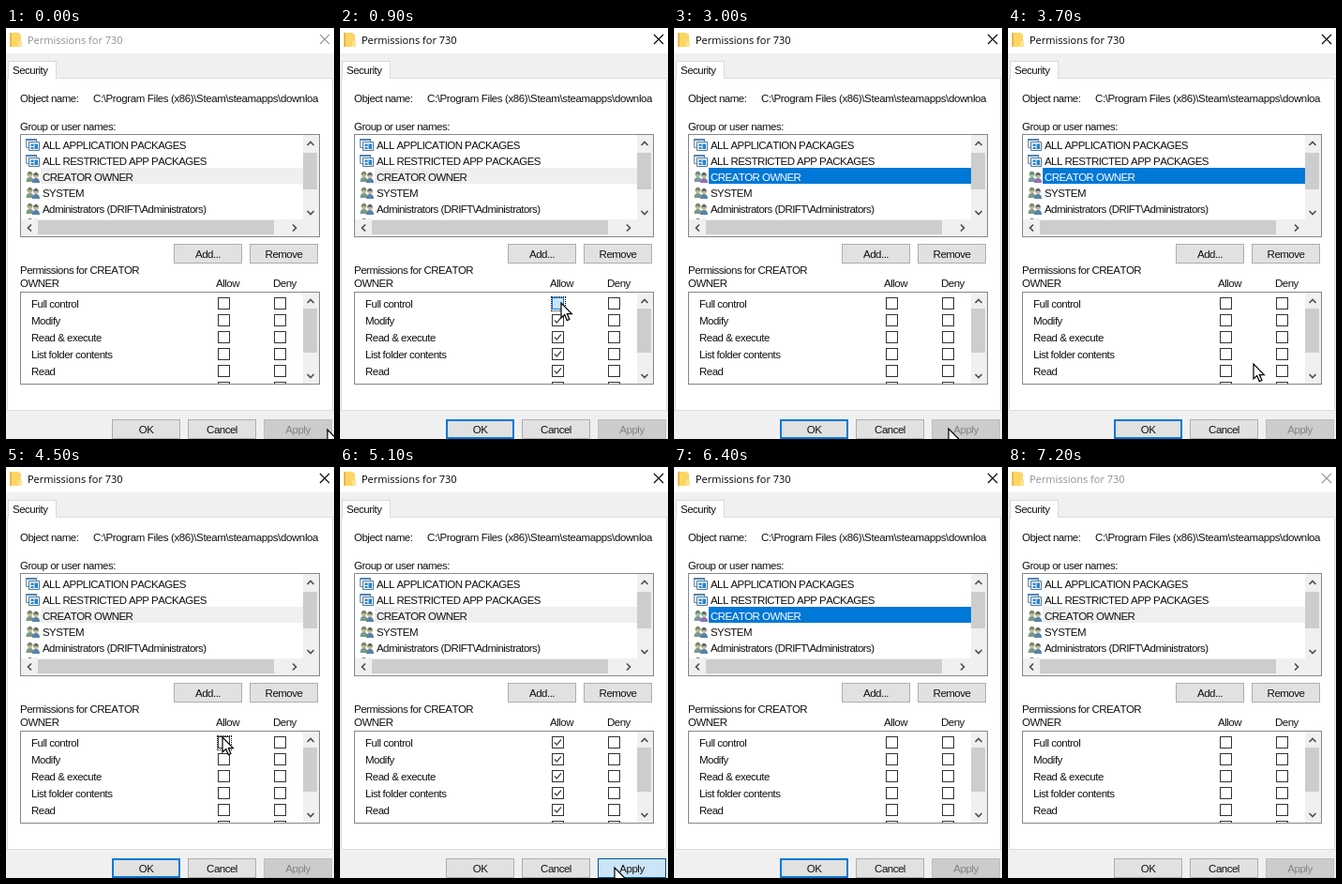
These frames come from a looping animation (350 px wide and 438 px high, 7.5 s). An HTML page:

```html
<!DOCTYPE html>
<html lang="en">
<head>
<meta charset="utf-8">
<title>Permissions dialog</title>
<style>
html, body { margin: 0; width: 100%; height: 100%; overflow: hidden; }
#stage { position: relative; width: 350px; height: 438px; overflow: hidden; background: #f0f0f0;
  font: 11.5px/14px "Liberation Sans", Arial, sans-serif; font-kerning: none;
  letter-spacing: -.5px; color: #111; }
#stage div, #stage svg { position: absolute; box-sizing: border-box; white-space: pre; }
svg { overflow: visible; fill: none; }
.bar { background: #fff; }
.title { font: 11px/14px "Open Sans", sans-serif; letter-spacing: 0; color: #000; }
.close { stroke: #000; stroke-width: 1.1; }
.inactive .title { color: #8f8f8f; }
.inactive .close { stroke: #999; }
.page { background: #fff; border: 1px solid #dcdcdc; }
.tab { background: #fff; border: 1px solid #d9d9d9; border-bottom: 0; }
.list { background: #fff; border: 1px solid #828790; overflow: hidden; }
.list .name { letter-spacing: -.55px; }
.path { letter-spacing: -.38px; overflow: hidden; }
.row { background: #efefef; }
.picked .row { background: #0078d7; }
.picked .owner { color: #fff; }
.picked .ownerIcon { filter: hue-rotate(60deg); }
.track { background: #f0f0f0; }
.thumb { background: #cdcdcd; }
.arrow { stroke: #505050; stroke-width: 1.7; }
.btn { background: #e1e1e1; border: 1px solid #adadad; text-align: center; line-height: 20px; }
.btn.def { border: 2px solid #0078d7; line-height: 18px; }
.btn.hot { background: #dceef8; border: 1px solid #0078d7; line-height: 20px; }
.btn.down { background: #cce4f7; border: 1px solid #005499; line-height: 20px; }
.btn.off { background: #ccc; border-color: #bfbfbf; color: #838383; }
.box { background: #fff; border: 1px solid #333; }
.box.hot { background: #cce4f7; border-color: #0078d7; }
.box svg { display: none; stroke: #444; stroke-width: 1.2; }
.box.on svg { display: block; }
.focus { border: 1px dotted #000; }
</style>
</head>
<body>
<div id="stage"></div>
<script>
const stage = document.getElementById('stage');

const div = (cls, x, y, w, h, inner = '', id = '') =>
  `<div class="${cls}" id="${id}" style="left:${x}px;top:${y}px;width:${w}px;height:${h}px">${inner}</div>`;
const text = (x, baseline, str, cls = '') =>
  `<div class="${cls}" style="left:${x}px;top:${baseline - 11}px">${str}</div>`;
const svg = (x, y, w, h, inner, cls = '') =>
  `<svg class="${cls}" style="left:${x}px;top:${y}px" width="${w}" height="${h}">${inner}</svg>`;
const path = (d, attrs = '') => `<path d="${d}" ${attrs}/>`;
const button = (id, x, y, label) => div('btn', x, y, 73, 21, label, id);

// Chevron centred on x, y, turned by deg
const arrow = (x, y, deg) =>
  svg(x, y, 1, 1, path('M-3.5 2L0 -1.5L3.5 2', `transform="rotate(${deg})"`), 'arrow');

const vScroll = (x, y, h, thumbY, thumbH) =>
  div('track', x, y, 17, h) + div('thumb', x, thumbY, 15, thumbH) +
  arrow(x + 7.5, y + 9, 0) + arrow(x + 7.5, y + h - 8, 180);

const folder = svg(4, 4, 13, 16,
  path('M1 1H9L12 3V16H1Z', 'fill="#fbd667"') +
  path('M0 1H2V16H0Z', 'fill="#eab944"') + path('M9 10H13V16H9Z', 'fill="#ffe394"'));

const packages = (x, y) => svg(x, y, 16, 14,
  path('M.5 .5H11.5V9.5H.5Z', 'fill="#f4f8fb" stroke="#6d8ca8"') +
  path('M0 0H12V2H0Z', 'fill="#5585ad"') +
  path('M3.5 3.5H14.5V12.5H3.5Z', 'fill="#eef5fa" stroke="#55799a"') +
  path('M5.5 5.5H8.5V8H5.5ZM5.5 9H8.5V11H5.5ZM9.5 5.5H13V11H9.5Z', 'fill="#2a84c6"'));

const person = (x, y, skin, hair, shirt) =>
  `<circle cx="${x}" cy="${y}" r="3" fill="${skin}"/>` +
  path(`M${x - 3} ${y}Q${x} ${y - 7} ${x + 3} ${y}Z`, `fill="${hair}"`) +
  path(`M${x - 4} ${y + 8}Q${x - 4} ${y + 3} ${x} ${y + 3}T${x + 4} ${y + 8}Z`, `fill="${shirt}"`);
const users = (x, y, cls = '') => svg(x, y, 16, 14,
  person(4.5, 4, '#b9b596', '#7f8466', '#7b9a83') +
  person(11, 5, '#cdb796', '#5f6a70', '#5583ab'), cls);

const check = svg(0, 0, 11, 11, path('M2 5.5L4.3 8L9 2.5'));

function groupList() {
  const names = ['ALL APPLICATION PACKAGES', 'ALL RESTRICTED APP PACKAGES', 'CREATOR OWNER',
    'SYSTEM', 'Administrators (DRIFT\\Administrators)'];
  let out = div('row', 21, 35, 280, 17);
  names.forEach((name, i) => {
    const y = 4 + i * 17;
    out += i < 2 ? packages(5, y) : users(5, y, i === 2 ? 'ownerIcon' : '');
    out += text(23, y + 11, name, i === 2 ? 'name owner' : 'name');
  });
  out += users(5, 88) + div('track', 0, 90, 318, 18) + div('thumb', 18, 91, 252, 15) +
    arrow(9, 98.5, -90) + arrow(292, 98.5, 90) + vScroll(301, 0, 91, 19, 39);
  return div('list', 15, 113, 320, 110, out);
}

function rightsList() {
  const rights = ['Full control', 'Modify', 'Read &amp; execute', 'List folder contents', 'Read', ''];
  let out = '';
  rights.forEach((right, i) => {
    const y = 5 + i * 18;
    out += text(11, y + 11, right) +
      div('box allow', 210, y, 13, 13, check) + div('box', 270, y, 13, 13);
  });
  out += div('focus', 209, 4, 16, 16, '', 'focus') + vScroll(301, 0, 97, 17, 47);
  return div('list', 15, 281, 320, 99, out);
}

stage.innerHTML =
  div('bar', 0, 0, 350, 27) + folder + text(23, 17, 'Permissions for 730', 'title') +
  svg(335, 7, 10, 10, path('M0 0L10 10M10 0L0 10'), 'close') +
  div('page', 1, 53, 348, 355) + div('tab', 2, 35, 52, 19) + text(7, 49, 'Security') +
  text(15, 79, 'Object name:') +
  div('path', 93, 68, 241, 14, 'C:\\Program Files (x86)\\Steam\\steamapps\\downloa') +
  text(15, 109, 'Group or user names:') + groupList() +
  button('add', 179, 230, 'Add...') + button('remove', 260, 230, 'Remove') +
  text(15, 262, 'Permissions for CREATOR') + text(15, 276, 'OWNER') +
  text(224, 276, 'Allow') + text(285, 276, 'Deny') + rightsList() +
  button('ok', 113, 417, 'OK') + button('cancel', 194, 417, 'Cancel') +
  button('apply', 275, 417, 'Apply') +
  svg(0, 0, 12, 19, path('M0 0V16L3.7 12.6L6.3 18.6L8.9 17.5L6.3 11.6H11.4Z',
    'fill="#fff" stroke="#000" stroke-width="1.2"'), 'cursor');

const LOOP = 7500, STEP = 100;

// Pointer stops: time, x, y
const stops = [
  [0, 343, 428], [700, 236, 293], [1100, 236, 293], [1800, 293, 427], [3300, 293, 427],
  [4100, 231, 288], [4700, 231, 288], [5100, 293, 427], [5200, 293, 427],
  [5600, 163, 428], [5900, 163, 428], [6300, 170, 442], [LOOP, 170, 442]
];

// Each entry changes part of the dialog's state from its time on
const changes = [
  [0, { active: false, picked: false, full: false, rest: false, hot: false, focus: false,
        ok: '', apply: 'off' }],
  [700, { hot: true }],
  [800, { active: true, focus: true, ok: 'def' }],
  [900, { rest: true }],
  [1000, { full: true, apply: '' }],
  [1300, { hot: false }],
  [1700, { apply: 'hot' }],
  [1900, { focus: false, ok: '' }],
  [3000, { picked: true, full: false, rest: false, ok: 'def', apply: 'off' }],
  [4100, { hot: true }],
  [4400, { picked: false, focus: true, hot: false }],
  [4600, { full: true, rest: true, apply: '' }],
  [5000, { apply: 'hot' }],
  [5100, { focus: false, ok: '', apply: 'down' }],
  [5300, { picked: true, full: false, rest: false, ok: 'def', apply: 'off' }],
  [5500, { ok: 'hot' }],
  [6200, { ok: 'def' }],
  [6800, { active: false, picked: false, ok: '' }]
];

const $ = id => document.getElementById(id);
const cursor = stage.querySelector('.cursor');
const allow = [...stage.querySelectorAll('.allow')];

function pointerAt(t) {
  const i = stops.findIndex(s => s[0] > t);
  const [t0, x0, y0] = stops[i - 1], [t1, x1, y1] = stops[i];
  const p = (t - t0) / (t1 - t0), e = p * p * (3 - 2 * p);
  return [x0 + (x1 - x0) * e, y0 + (y1 - y0) * e];
}

function draw(t) {
  const s = Object.assign({}, ...changes.filter(c => c[0] <= t).map(c => c[1]));
  stage.classList.toggle('inactive', !s.active);
  stage.classList.toggle('picked', s.picked);
  allow.forEach((box, i) => box.classList.toggle('on', i ? s.rest : s.full));
  allow[0].classList.toggle('hot', s.hot);
  $('focus').style.visibility = s.focus ? 'visible' : 'hidden';
  $('ok').className = 'btn ' + s.ok;
  $('apply').className = 'btn ' + s.apply;
  const [x, y] = pointerAt(t);
  cursor.style.transform = `translate(${Math.round(x)}px, ${Math.round(y)}px)`;
}

const start = performance.now();
function tick() {
  const t = (performance.now() - start) % LOOP;
  draw(Math.floor(t / STEP) * STEP);
  requestAnimationFrame(tick);
}
tick();
</script>
</body>
</html>
```
